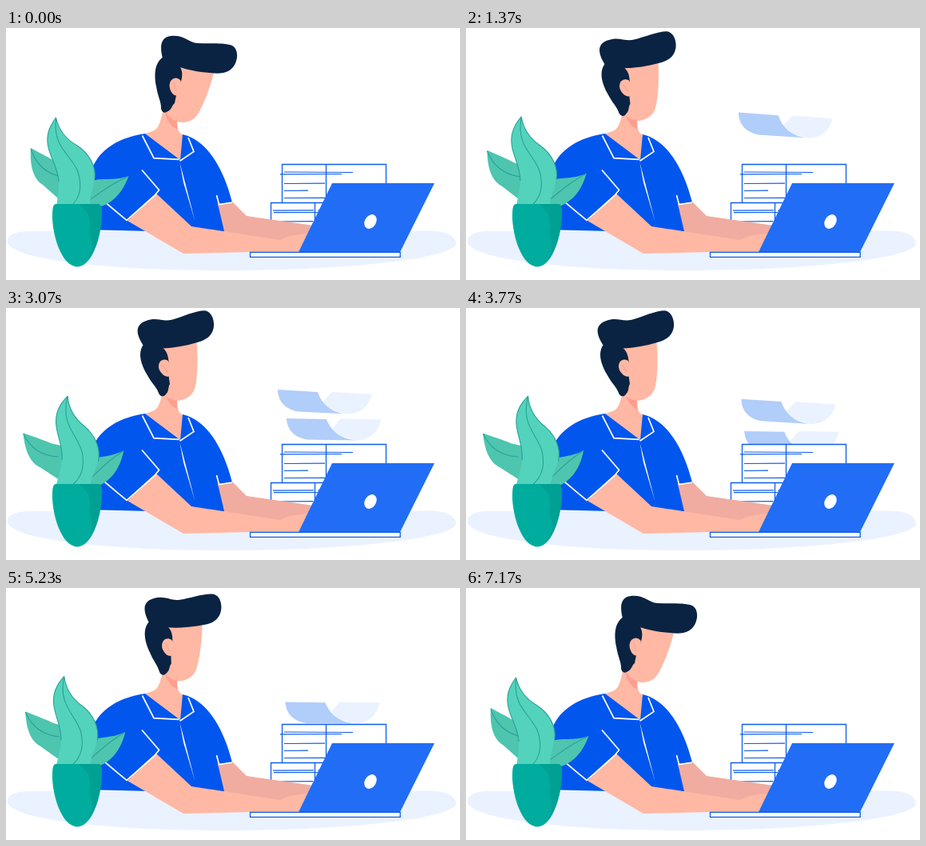
Recreate the animation shown at these times as an HTML page. Size 568 by 315 pixels, loop 7210 ms.

```html
<!DOCTYPE html>
<html lang="en">
<head>
<meta charset="utf-8">
<title>At the desk</title>
<style>
  html, body { margin: 0; width: 100%; height: 100%; overflow: hidden; background: #fff; }
  svg { display: block; width: 568px; height: 315px; }
  .skin { fill: #ffb8a3; }
  .hair { fill: #0a2342; }
  .shirt { fill: #0156ee; }
  .box { fill: #fff; stroke: #0d5ceb; stroke-width: 1.3; }
  .ink { fill: none; stroke: #0d5ceb; stroke-width: 1.2; }
  .seam { fill: none; stroke: #fff; stroke-width: 1.7; }
  .vein { fill: none; stroke: #2ba098; stroke-width: 1.1; }
  .side { fill: #4dc5af; }
</style>
</head>
<body>
<svg viewBox="0 0 568 315">
  <defs>
    <g id="sheet">
      <path fill="#eaf2ff" d="M68-1H118C115 15 104 25 89 25.500L62 20L57 12C61 8 64 3 68-1Z"/>
      <path fill="#b1cdf9" d="M0 0H50C54 10 64 25 89 25.500L27 26C11 24 1 15 0 0Z"/>
    </g>
  </defs>

  <path fill="#eaf2ff" d="M2 267C2 258 12 254 30 254L530 253.500C553 254 563 261 563 269C563 288 430 303 270 303C120 303 2 288 2 267Z"/>

  <use href="#sheet" class="paper"/>
  <use href="#sheet" class="paper"/>

  <!-- books -->
  <path class="box" d="M331.500 218.500H462V256H331.500ZM386.500 218V256M345.500 170.500H475.500V218.500H345.500ZM400.500 170V218"/>
  <path class="ink" d="M348 180L434 180.500M343 182.800L420 182.500M348 194.500L399 194.200M348 203.500L378 203.200M348 212.500L399 212.300
    M334 228.200L385 227.800M335 230.700L393 230.500M334 242L384 241.700M390 228H397"/>

  <!-- body -->
  <path fill="#f0aca0" d="M265 220L283 217L301 235L392 248L378 266L343 266L270 258Z"/>
  <path class="skin" d="M196 104C194 115 191 124 187 127C183 130 178 130 173 133L218 167L222 134C216 131 214 128 214 112Z"/>
  <path fill="#ff9d8f" d="M199 104C201 116 207 124 214 126V110Z"/>
  <path class="shirt" d="M174 132C141 137 118 151 108 175L98 252L180 254L273 254L265 220L283 218C274 182 255 141 221 133L218 165Z"/>
  <path class="skin" d="M152 241L188 207L232 248L343 265C352 260 362 258 378 257L366 280L305 280L222 282Z"/>
  <path class="seam" d="M123 217L151 240.500L188 207.500M170 177.500L191.500 202.500L187 208M263.500 209L266.500 220.500L283 218M170.500 134.500L185 162.700L216.500 164.300M217.500 166.300L235 154.500L228 137"/>
  <path fill="#fff" d="M217.500 168L236.500 241.500L222 193Z"/>

  <g id="head">
    <path class="skin" d="M218 48L260 56C256 72 249 92 241 106C235 117 225 119 215 117.500C208 115 203 110 200 104L206 78Z"/>
    <path class="hair" d="M197 36C186 43 185 58 188 73C190 86 194 92 194 99C194 104 197 107 201 105C208 102 207 97 211 94L213 84L219 67C221 60 221 54 218 49L225 40Z"/>
    <path class="skin" d="M218.500 65.500C213 59.500 205 63 204.500 72C205 79 209 84.500 213 84.500L220 78Z"/>
    <path fill="none" stroke="#ff9d8f" d="M209 68C212 69 211 75 213 79"/>
    <path class="hair" d="M196 38C192 22 193.500 10.500 208 9.700C224 9 228 18 240 19C254 20 272 18 283 22C292 27 290 42 284 49C277 57 268 57.500 255 56C240 55 227 52 217 49Z"/>
  </g>

  <!-- laptop -->
  <path fill="#216df5" d="M408 194H536L493 280H366Z"/>
  <ellipse cx="456" cy="242" rx="7" ry="9.500" transform="rotate(32 456 242)" fill="#fff"/>
  <path class="box" d="M305.500 280.300H493.200V286.300H305.500Z"/>

  <!-- plant -->
  <g id="left">
    <path class="side" d="M31 150C44 157 54 162 64 168L84 176L80 226L64 212L46 196C32 187 30 168 31 150Z"/>
    <path class="vein" d="M31 151C37 170 50 182 70 186"/>
  </g>
  <g id="right">
    <path class="side" d="M153.500 185C134 192 118 186 106 192L100 226C124 226 143 214 153.500 185Z"/>
    <path class="vein" d="M153 185.500C132 194 118 206 106 214"/>
  </g>
  <g id="middle">
    <path fill="#53d3bc" d="M62.500 112C56 121 51 130 52 143C53 160 65 172 66 192C66 204 65 212 62 228H106C103 214 108 205 111 188C113 172 103 156 89 147C75 139 66 128 62.500 112Z"/>
    <path class="vein" d="M62.500 112C56 121 51 130 52 143C53 160 65 172 66 192M62.500 112C66 128 75 139 89 147C103 156 113 172 111 188M62.500 113C58 150 82 158 90 180C95 196 93 210 84 220"/>
  </g>
  <path fill="#00ac9e" d="M62 220H116C120 221 120 228 120 234C119 262 108 297 89.500 298.500C70 298 59 262 58 238C58 228 58 221 62 220Z"/>
  <path fill="#00a094" d="M92 220H116C120 221 120 228 120 234C119 256 112 279 102 291C108 279 109 270 106 262C101 255 108 248 104 241C106 231 98 229 92 220Z"/>
</svg>
<script>
const LOOP = 7210, LAG = 1940;
const $ = id => document.getElementById(id);
const papers = document.querySelectorAll('.paper');
const clamp = v => Math.min(1, Math.max(0, v));
const span = (t, a, b) => clamp((t - a) / (b - a));

// time, x, y, tilt of a falling sheet
const fall = [
  [2250, 339, 88, 2], [3070, 340, 102, 3.3], [3310, 341, 105.500, 4.3], [4470, 350, 126, 3],
  [5010, 351, 138, 1.2], [5230, 349.500, 142.500, 0.8], [6170, 347, 165, 1], [6700, 346, 178, 1]
];

function turn(id, angle, x, y) {
  $(id).setAttribute('transform', `rotate(${angle} ${x} ${y})`);
}

function drop(paper, t) {
  const i = Math.max(1, fall.findIndex(k => k[0] > t));
  const a = fall[i - 1], b = fall[i], f = span(t, a[0], b[0]);
  const [, x, y, tilt] = a.map((v, n) => v + (b[n] - v) * f);
  paper.setAttribute('transform', `translate(${x} ${y}) rotate(${tilt})`);
  paper.setAttribute('opacity', t < 6500 ? span(t, 2250, 2950) : 0);
}

function draw(now) {
  const t = now % LOOP;

  const sway = Math.sin(Math.PI * t / LOOP) ** 1.4;
  turn('left', -9 * sway, 68, 216);
  turn('right', -9 * sway, 105, 222);
  turn('middle', 7.8 * sway, 84, 222);

  const up = 1 - (1 - span(t, 0, 2230)) ** 2.6;
  const down = span(t, 3600, 6130) ** 2.7;
  turn('head', -19.5 * (up - down), 211, 112);

  papers.forEach((p, i) => drop(p, t + LAG * (1 - i)));
}

const start = performance.now();
function tick() {
  draw(performance.now() - start);
  requestAnimationFrame(tick);
}
tick();
</script>
</body>
</html>
```
